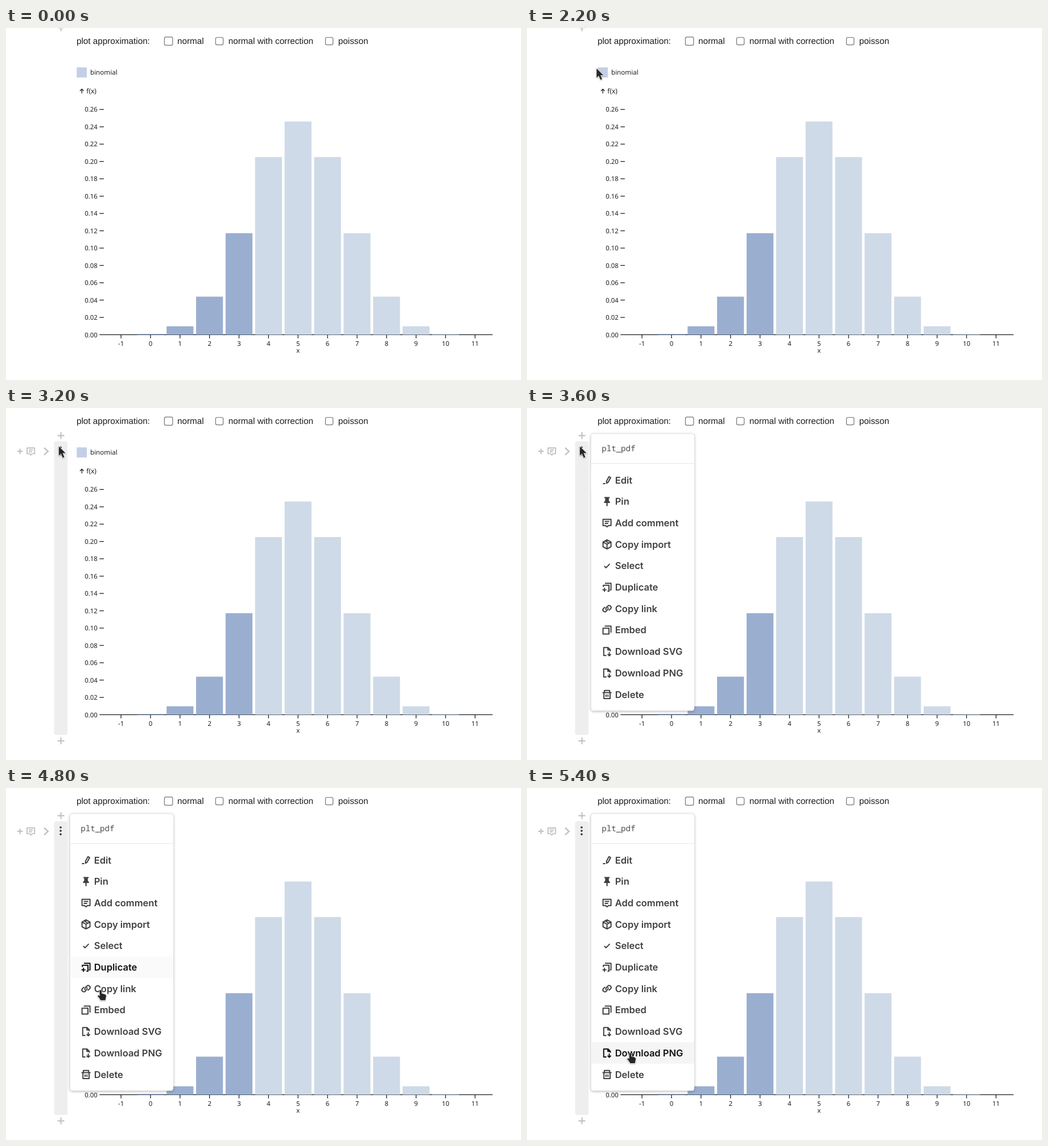
Animation of 905x619 px, one loop 6.6 s. Source, as an HTML page:

```html
<!DOCTYPE html>
<html lang="en">
<head>
<meta charset="utf-8">
<title>Binomial plot</title>
<style>
  html, body { margin: 0; width: 100%; height: 100%; overflow: hidden; background: #fff; }
  svg { display: block; width: 905px; height: 619px; text-rendering: geometricPrecision; }
  .form { font: 15.25px Arial, "Liberation Sans", sans-serif; fill: #1b1e23; }
  .plot { font: 11.4px "Noto Sans", "Open Sans", sans-serif; fill: #1b1e23; }
  .axis { stroke: #1b1e23; stroke-width: 1.3; fill: none; }
  .tool { stroke: #c2c2c2; stroke-width: 2.2; fill: none; }
  .card { fill: #fff; filter: drop-shadow(0 1.5px 2.5px rgba(0,0,0,.24)) drop-shadow(0 0 .6px rgba(0,0,0,.3)); }
  .name { font: 14.1px "Noto Sans Mono", "DejaVu Sans Mono", monospace; fill: #4a4a4a; }
  .row { font: 600 16.5px Inter, sans-serif; color: #404040; fill: currentColor; }
  .row.on { color: #111; }
  .row path { fill: none; stroke: currentColor; stroke-width: 2; stroke-linejoin: round; }
  .row path.solid { fill: currentColor; stroke: none; }
  .pointer { fill: #262626; stroke: #fff; stroke-width: 1.3; stroke-linejoin: round;
    paint-order: stroke; filter: drop-shadow(0 1px 1px rgba(0,0,0,.3)); }
</style>
</head>
<body>
<svg viewBox="0 0 905 619">
  <g id="form" class="form"><text x="124" y="28.3">plot approximation:</text></g>

  <g id="plot" class="plot">
    <rect x="124.3" y="69.3" width="17.7" height="17.7" fill="#c3cfe4"/>
    <text x="148" y="81.8" font-size="11.6">binomial</text>
    <path class="axis" d="M133.3 115V107.6M130 110.8l3.3-3.4 3.3 3.4" stroke-width="1.1"/>
    <text x="141.3" y="115" font-size="12">f(x)</text>
    <path class="axis" d="M164.3 539.4H855"/>
    <text x="513.2" y="571" text-anchor="middle">x</text>
  </g>

  <path id="topPlus" class="tool" d="M90.5-.6h12M96.5-6.6v12"/>

  <g id="side">
    <rect x="84.5" y="58.5" width="23.7" height="516.5" rx="4" fill="#eee"/>
    <g class="tool">
      <path d="M90.5 48.6h12M96.5 42.6v12M90.5 585.3h12M96.5 579.3v12"/>
      <path d="M19.8 76.2h9.6M24.6 71.4v9.6"/>
      <path d="M37 70.2h13.2v10.2h-4.4l-2.2 2.4-2.2-2.4H37zM40 73.7h7.2M40 77h5.4" stroke-width="1.9" stroke-linejoin="round"/>
      <path d="M67 70l6.8 6.3-6.8 6.3" stroke-width="2.5"/>
    </g>
    <g fill="#383838">
      <circle cx="96" cy="69.2" r="1.8"/><circle cx="96" cy="75.3" r="1.8"/><circle cx="96" cy="81.4" r="1.8"/>
    </g>
  </g>

  <g id="menu">
    <rect class="card" x="112.3" y="45.2" width="181.7" height="487.3" rx="4.5"/>
    <path d="M112.3 97.6H294" stroke="#e6e6e6"/>
    <text class="name" x="131.3" y="75.8">plt_pdf</text>
    <rect id="hover" x="112.6" width="181.2" height="37.7"/>
  </g>

  <path id="arrow" class="pointer" d="M0 0V16.3L3.8 12.8 6.9 19.9 9.7 18.7 6.7 11.8H11.8Z"/>
  <path id="hand" class="pointer" d="M-1.8 1.6C-1.8-.5 1.8-.5 1.8 1.6L2 6.6C3 5.9 4.6 6.2 4.9 7.2 6 6.6 7.4 7 7.7 8.1 8.9 7.7 9.6 8.6 9.6 10 9.6 13.4 8.7 14 8.4 18H-.2C-.6 15.8-2.8 13.8-4.8 11.2-5.8 9.8-4.2 8.4-2.8 9.6L-1.6 10.8Z"/>
</svg>

<script>
const LOOP = 6600;
const $ = id => document.getElementById(id);

function add(parent, tag, attrs, text = '') {
  const el = document.createElementNS('http://www.w3.org/2000/svg', tag);
  for (const key in attrs) el.setAttribute(key, attrs[key]);
  el.textContent = text;
  return parent.appendChild(el);
}

// Check boxes
[['normal', 285.6, 14.4], ['normal with correction', 375, 13.2], ['poisson', 568, 13.2]]
  .forEach(([label, x, size]) => {
    add($('form'), 'rect', { x: x - size / 2, y: 23.1 - size / 2, width: size, height: size,
      rx: 2.6, fill: '#fff', stroke: '#767676', 'stroke-width': 1.2 });
    add($('form'), 'text', { x: x === 285.6 ? 301 : x + 15.8, y: 28.3 }, label);
  });

// Chart: binomial distribution with n = 10, p = 0.5
const BASE = 539.4, UNIT = 1523.5, STEP = 51.85;
const xAt = k => 253.95 + k * STEP;

for (let i = 0; i <= 13; i++) {
  const y = BASE - i * 0.02 * UNIT;
  add($('plot'), 'text', { x: 160.8, y: y + 4.1, 'text-anchor': 'end' }, (i * 0.02).toFixed(2));
  if (i) add($('plot'), 'path', { class: 'axis', d: `M164.3 ${y}h7.6` });
}
for (let k = -1; k <= 11; k++) {
  add($('plot'), 'path', { class: 'axis', d: `M${xAt(k)} ${BASE}v6.3` });
  add($('plot'), 'text', { x: xAt(k), y: 558.8, 'text-anchor': 'middle' }, k);
}
for (let k = 0, p = 1 / 1024; k <= 10; p *= (10 - k) / (k + 1), k++) {
  add($('plot'), 'rect', { x: xAt(k) - 23.6, y: BASE - p * UNIT, width: 47.2, height: p * UNIT,
    fill: k <= 3 ? '#9aaed0' : '#ceдae7'.replace('д', 'd') });
}

// Menu rows
const rowY = i => 126.7 + i * 37.7;
const sheet = 'M-1 7H-5.8V-7H1.8L5.8-3V-.5M-2-7M1.5-6.5V-2.8H5.5M4 1V7M1 4.6L4 7.6 7 4.6';
const rows = [
  ['Edit', 'M-.8 5.6L-.9 2.2 3.4-6 6.4-4.4 2 3.8ZM-7.2 6.3H-3'],
  ['Pin', 'M-4.6-8H4.6V-6H3.2V-1.4L5.2 .8V2.6H1.1V8H-1.1V2.6H-5.2V.8L-3.2-1.4V-6H-4.6Z', 'solid'],
  ['Add comment', 'M-7-6.4H7V4.6H2.4L0 7 -2.4 4.6H-7ZM-4-2.6H4M-4 .9H2'],
  ['Copy import', 'M0-8L7-4.2V4.2L0 8-7 4.2V-4.2ZM-7-4.2L0-.3 7-4.2M0-.3V8M-3.6-6.1L3.5-2.2'],
  ['Select', 'M-4.8 .4L-1.6 3.4 4.8-3.4'],
  ['Duplicate', 'M-3.6-7H7V4.6H5M-6.4-.5V-3.4H3.4V7H.8M-8 4.6H-1M-4.5 1.1V8.1'],
  ['Copy link', 'M-1.4 2.4C-3-.2-1.6-1.6 1.5-4.6 4-7.6 9.4-3.4 6.4 .1L3.2 3M1.4-2.4C3 .2 1.6 1.6-1.5 4.6-4 7.6-9.4 3.4-6.4-.1L-3.2-3'],
  ['Embed', 'M-7-3.4H3.4V7H-7ZM-4-7H7V4.4'],
  ['Download SVG', sheet],
  ['Download PNG', sheet],
  ['Delete', 'M-8-3.2H8M-4.6-3.2V-7H4.6V-3.2M-5.4-3.2V7.2H5.4V-3.2M-1.7 0V4.4M1.7 0V4.4']
].map(([label, d, kind = ''], i) => {
  const row = add($('menu'), 'g', { class: 'row', transform: `translate(140.6 ${rowY(i)})` });
  add(row, 'path', { d, class: kind });
  add(row, 'text', { x: 14.1, y: 5.8 }, label);
  return row;
});

// Pointer poses: time, x, y
const poses = [
  [1800, 116.5, -16.5], [1900, 119, 9], [2000, 121, 33], [2100, 122, 54], [2200, 122.3, 71.2],
  [2300, 118.5, 85], [2400, 113.5, 95], [2500, 111.3, 104],
  [2700, 109, 101], [2800, 105, 94], [2900, 101, 86], [3000, 97, 78], [3100, 94, 71], [3200, 92.8, 67.5],
  [4200, 96, 80], [4300, 116, 124], [4400, 126.4, 163.2], [4500, 135, 211], [4600, 146, 262],
  [4700, 158, 312], [4800, 166.3, 355.3], [4900, 172, 390], [5000, 176, 418],
  [5100, 178.5, 438], [5200, 180, 452], [5300, 181, 461], [5400, 181.4, 466]
];
const poseAt = t => poses.filter(p => p[0] <= t).pop();

// The highlighted row trails the pointer by one step
function rowAt(t) {
  if (t < 4400) return -1;
  return Math.round((poseAt(t - 100)[2] + 2 - rowY(0)) / 37.7);
}

const show = (el, on) => el.setAttribute('visibility', on ? 'visible' : 'hidden');

function draw(t) {
  const pose = poseAt(t), isHand = t >= 4300, active = rowAt(t);
  show($('topPlus'), t < 2500);
  show($('side'), t >= 2500);
  show($('menu'), t >= 3600);
  show($('arrow'), pose && !isHand);
  show($('hand'), pose && isHand);
  if (pose) $(isHand ? 'hand' : 'arrow').setAttribute('transform', `translate(${pose[1]} ${pose[2]})`);

  rows.forEach((row, i) => row.classList.toggle('on', i === active));
  $('hover').setAttribute('y', rowY(Math.max(active, 0)) - 18.85);
  $('hover').setAttribute('fill', active < 0 ? '#fff' : active === 0 ? '#fdfdfd' : t < 5400 ? '#fafafa' : '#f5f5f5');
}

function tick() {
  draw(performance.now() % LOOP);
  requestAnimationFrame(tick);
}
tick();
</script>
</body>
</html>
```
